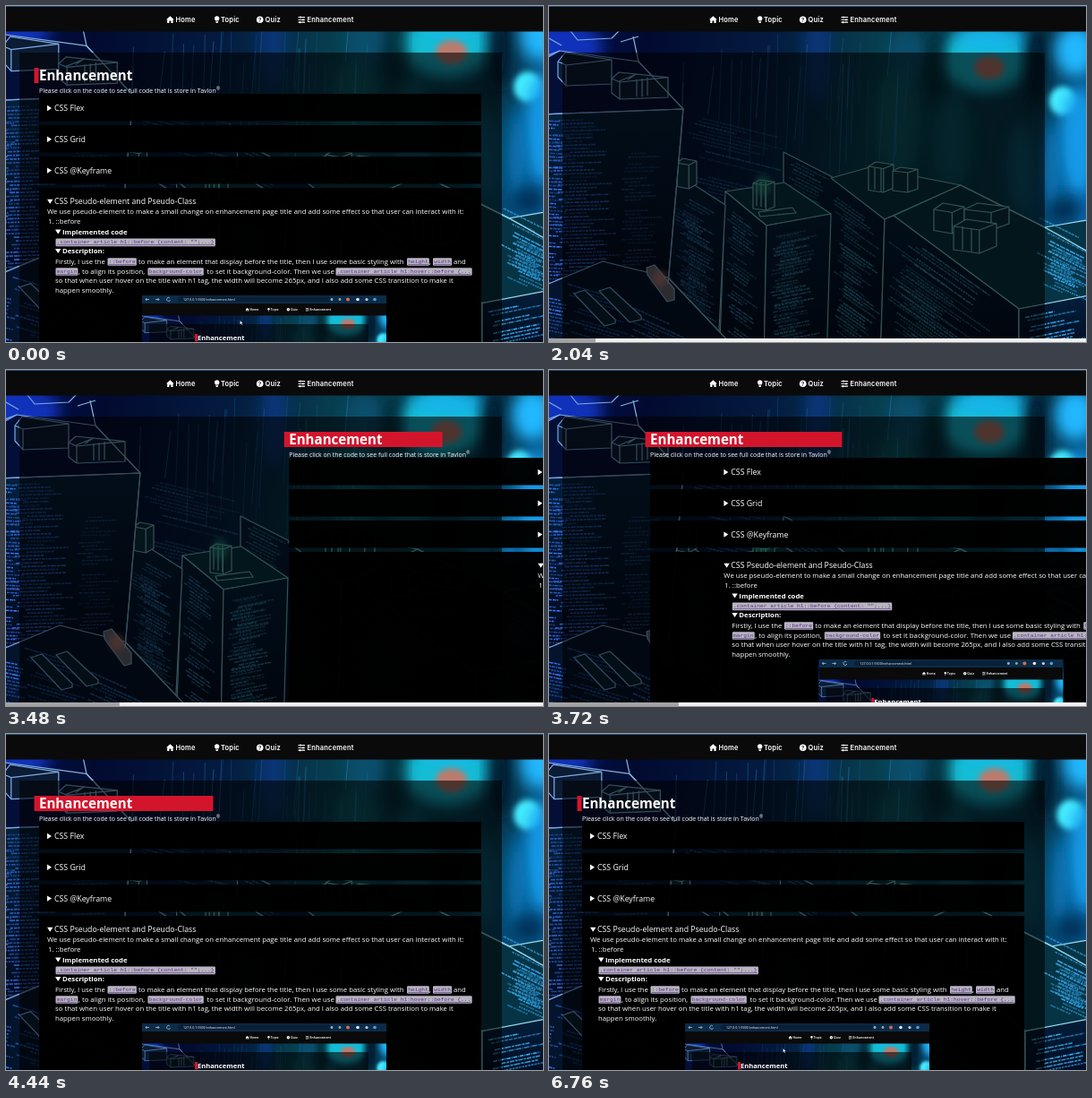
Recreate the animation shown at these times as an HTML page. Size 600x375 px, loop 6.8 s.

```html
<!DOCTYPE html>
<html lang="en">
<head>
<meta charset="utf-8">
<title>Enhancement</title>
<style>
html, body { margin: 0; width: 100%; height: 100%; overflow: hidden; background: #000; }
svg { display: block; width: 100vw; height: 100vh; }
text { font-family: "Open Sans", "Noto Sans", sans-serif; fill: #fff; font-size: 7.77px; white-space: pre; }
.nav text { font-family: Inter, "Open Sans", sans-serif; font-weight: 600; font-size: 7.5px; letter-spacing: .2px; }
.h1 { font-size: 15.1px; font-weight: 700; }
.sub { font-size: 6.94px; }
.sum { font-size: 8.75px; }
.b { font-weight: 700; }
text.code { font-family: "Liberation Mono", monospace; font-size: 6.24px; fill: #55308c; text-decoration: underline; }
.tiny { font-size: 3.6px; }
.edge, .face { stroke: url(#rim); stroke-width: 1.2; stroke-linejoin: round; }
.edge { fill: none; }
</style>
</head>
<body>
<svg viewBox="0 0 600 375" preserveAspectRatio="none">
  <defs>
    <linearGradient id="sky" x2="1" y2=".12">
      <stop offset="0" stop-color="#04145c"/><stop offset=".2" stop-color="#020a30"/><stop offset=".42" stop-color="#041c40"/>
      <stop offset=".6" stop-color="#083f50"/><stop offset=".88" stop-color="#06384c"/><stop offset="1" stop-color="#0866a8"/>
    </linearGradient>
    <linearGradient id="wall" x2="0" y2="1">
      <stop offset="0" stop-color="#04203c"/><stop offset="1" stop-color="#02091c"/>
    </linearGradient>
    <linearGradient id="rim" gradientUnits="userSpaceOnUse" x2="600">
      <stop offset="0" stop-color="#78a4e8"/><stop offset=".25" stop-color="#86bcd0"/>
      <stop offset=".5" stop-color="#74c4bc"/><stop offset=".85" stop-color="#7cc8c8"/><stop offset="1" stop-color="#a4e0ff"/>
    </linearGradient>
    <linearGradient id="ink" gradientUnits="userSpaceOnUse" x2="600">
      <stop offset="0" stop-color="#3a74ff"/><stop offset=".2" stop-color="#3a88d8"/>
      <stop offset=".5" stop-color="#38a0b8"/><stop offset=".85" stop-color="#3ca8c8"/><stop offset="1" stop-color="#30a8ff"/>
    </linearGradient>
    <filter id="soft" x="-50%" y="-50%" width="200%" height="200%"><feGaussianBlur stdDeviation="8"/></filter>
    <filter id="mild" x="-50%" y="-50%" width="200%" height="200%"><feGaussianBlur stdDeviation="3"/></filter>
    <clipPath id="shotClip"><rect x="152" y="323" width="273" height="52"/></clipPath>
    <g id="city"></g>
  </defs>
  <use id="back" href="#city"/>
  <rect x="15" y="52" width="539" height="323" fill="#000" fill-opacity=".58"/>
  <g id="article">
    <rect id="bar" x="31.5" y="69" height="17" fill="#d3152c"/>
    <text class="h1" x="37" y="83">Enhancement</text>
    <text class="sub" x="37" y="96.5">Please click on the code to see full code that is store in Tavlon<tspan dy="-2.4" font-size="5.4">®</tspan></text>
    <g id="boxes" fill="#000" fill-opacity=".98"></g>
    <g id="inner"></g>
  </g>
  <rect width="600" height="28.5" fill="#0a0a0b"/>
  <rect width="600" height="1" fill="#174a78"/>
  <g class="nav" id="nav" fill="#fff"></g>
  <g id="scroll">
    <rect y="371" width="600" height="4" fill="#f1f1f1"/>
    <rect id="thumb" y="371" height="4" fill="#a3a3a3"/>
  </g>
</svg>
<script>
const LOOP = 6800, RELOAD = 1840, START = 2490, SETTLE = 3983;
const $ = id => document.getElementById(id);
const clamp = (v, a = 0, b = 1) => Math.min(b, Math.max(a, v));
const span = (t, a, b) => clamp((t - a) / (b - a));

let seed = 7;
const rnd = () => (seed = seed * 16807 % 2147483647) / 2147483647;

// ---- backdrop ----
const glow = (x, y, rx, ry, c, o, f = 'soft') =>
  `<ellipse cx="${x}" cy="${y}" rx="${rx}" ry="${ry}" fill="${c}" opacity="${o}" filter="url(#${f})"/>`;
const face = (pts, fill = 'url(#wall)') => `<polygon class="face" points="${pts}" fill="${fill}"/>`;
const roof = pts => face(pts, '#063444');
const edge = d => `<path class="edge" d="${d}"/>`;

// rows of dashes that read as distant source code
function code(x, y, w, h, slope, op = .8) {
  let out = '';
  for (let r = 0; r < h; r += 4) {
    if (rnd() < .12) continue;
    const a = x + rnd() * w * .25, b = a + w * (.3 + rnd() * .45);
    const dash = [2 + rnd() * 5, 1, 1 + rnd() * 3, .8].map(n => n.toFixed(1)).join(' ');
    const at = px => `${px.toFixed(1)} ${(y + r + (px - x) * slope).toFixed(1)}`;
    out += `<path d="M${at(a)}L${at(b + .01)}" stroke-dasharray="${dash}" opacity="${(op * (.4 + rnd() * .6)).toFixed(2)}"/>`;
  }
  return `<g stroke="url(#ink)" stroke-width="1.6">${out}</g>`;
}

// small block: top-left x,y, size, and skew of its top
const block = (x, y, w, h, d) =>
  face(`${x},${y + d} ${x + w * .3},${y} ${x + w},${y + d * .6} ${x + w},${y + h - d} ${x + w * .6},${y + h} ${x},${y + h - d * .5}`, '#0a3540') +
  edge(`M${x} ${y + d}L${x + w * .6} ${y + d * 1.5}L${x + w} ${y + d * .6}M${x + w * .6} ${y + d * 1.5}V${y + h}`);

// flat low box with a front and a right side
const slab = (x, y, w, h, d) =>
  face(`${x},${y + d} ${x + 8},${y} ${x + w},${y + d * .8} ${x + w},${y + h - 2} ${x + 9},${y + h} ${x},${y + h - d}`, '#0b1c34') +
  edge(`M${x} ${y + d}L${x + 9} ${y + d + 4}L${x + w} ${y + d * .8}M${x + 9} ${y + d + 4}V${y + h}`);

let streaks = '';
for (let i = 0; i < 30; i++) {
  const x = 150 + rnd() * 260, y = 20 + rnd() * 70;
  streaks += `<path d="M${x} ${y}l-${2 + rnd() * 5} ${50 + rnd() * 80}" stroke="#2a84c0" opacity="${.15 + rnd() * .35}"/>`;
}

$('city').innerHTML =
  '<rect x="-10" y="-10" width="640" height="420" fill="url(#sky)"/>' +
  glow(10, 45, 50, 28, '#1440e8', .7) + glow(300, 50, 14, 60, '#0a3c98', .6) +
  glow(390, 130, 26, 60, '#0f6c74', .6) + glow(450, 150, 22, 55, '#0d6878', .55) + glow(400, 55, 22, 28, '#0a5a80', .6) +
  glow(527, 180, 16, 50, '#0e6a88', .6) +
  glow(487, 60, 48, 36, '#18c4dc', .95) + glow(495, 36, 45, 14, '#18b4f0', .8) + glow(492, 69, 17, 13, '#d8705c', .85, 'mild') +
  glow(545, 66, 11, 46, '#02182c', .95) + glow(432, 70, 9, 40, '#03202c', .7) +
  glow(588, 50, 22, 28, '#20b8ff', 1) + glow(574, 106, 15, 16, '#48f0ff', 1, 'mild') +
  glow(592, 150, 22, 60, '#14a0f0', .9) + glow(562, 180, 8, 50, '#0c80c8', .9) + glow(575, 228, 18, 14, '#042a50', .9) + streaks +
  code(150, 120, 120, 90, .25, .5) +
  // far towers
  face('262,163 315,190 375,238 370,400 262,400') + roof('315,192 358,180 460,200 375,238') +
  code(265, 170, 50, 60, .5, .6) + code(318, 212, 55, 165, .7) + code(322, 230, 48, 130, .7, .5) +
  roof('385,234 460,200 554,247 630,234 630,320 525,338') + face('385,234 525,338 525,400 370,400 375,238') +
  face('525,338 630,318 630,400 525,400') +
  code(388, 250, 120, 130, .7) + code(378, 262, 100, 110, .7, .6) +
  code(530, 348, 80, 40, -.2, 1) + code(545, 235, 70, 60, .5, 1) + code(552, 262, 60, 50, .45, 1) + edge('M460 200L554 247L630 290') +
  block(357, 174, 28, 34, 5) + block(384, 180, 28, 28, 4) + edge('M364 180V205M371 181V207') +
  block(430, 220, 34, 34, 7) + block(464, 220, 50, 30, 7) + block(452, 238, 48, 38, 8) + edge('M462 246V272M472 248V274') +
  roof('197,207 263,197 315,232 243,245') + face('197,207 243,245 240,400 190,400') + face('243,245 315,232 310,400 240,400') +
  code(198, 225, 42, 160, .7) + code(247, 256, 60, 130, -.2) + code(250, 258, 55, 125, -.2, .5) +
  block(228, 194, 24, 34, 4) + edge('M232 197V223M237 196V224M242 196V225M234 230l38-5 4 6-40 4z') + glow(239, 200, 9, 12, '#38c8a8', .45, 'mild') +
  face('135,185 147,190 197,222 188,400 130,400') + code(146, 210, 45, 140, .55) + code(140, 225, 50, 130, .55, .5) + block(143, 170, 22, 34, 5) +
  // near tower
  face('-10,62 12,50 100,62 150,115 0,122 -10,120', '#040f38') + face('-10,121 150,115 133,310 -10,330') +
  code(4, 128, 80, 180, -.03) + code(80, 165, 52, 130, -.03, .5) + code(-6, 128, 30, 190, .05, 1) +
  slab(10, 52, 60, 37, 10) + slab(70, 74, 63, 30, 7) + edge('M78 84l20-8M88 82l8-5M98 82V101M104 81V101M110 80V100') +
  edge('M24 28L32 38L70 36L78 28M80 40l20-6M-4 56L12 50M0 36l14 8M100 62L94 34') +
  face('-10,314 60,285 133,303 225,400 -10,400', '#03142c') + code(20, 310, 80, 60, .3, .6) + code(90, 335, 90, 60, .45) + code(-6, 325, 35, 50, .2, 1) +
  face('28,321 40,317 74,350 74,354 62,357', '#0a2234') + face('56,318 68,314 103,346 103,350 90,353', '#0a2234') +
  face('109,292 118,289 140,316 140,328 132,330 110,300', '#6a6a74') + glow(124, 304, 8, 9, '#e08478', .6, 'mild') +
  edge('M150 115L133 310M-10 121L150 115L100 62M133 303L225 400');

// ---- page content ----
const text = (x, y, s, cls = '') => `<text x="${x}" y="${y}" class="${cls}">${s}</text>`;
const closed = (x, y) => `<path d="M${x} ${y - 3.2}l5 3.2-5 3.2z" fill="#fff"/>`;
const open = (x, y) => `<path d="M${x} ${y - 2.5}h6.4l-3.2 5z" fill="#fff"/>`;
const chip = (x, base, s) =>
  `<rect x="${x}" y="${base - 6.4}" width="${s.length * 3.745 + 2.4}" height="8.6" rx="1.2" fill="#b9b5c0"/>` + text(x + 1.2, base - .6, s, 'code');

$('boxes').innerHTML = [[98, 30.5], [133, 30.5], [168, 30.5], [203, 180]]
  .map(([y, h]) => `<rect x="37" y="${y}" width="494" height="${h}"/>`).join('');

const nav =
  '<path d="M179 15.3l4.4-4 4.4 4h-1.2v3.7h-2.2v-2.4h-2v2.4h-2.2v-3.7z"/>' + text(189.5, 18, 'Home') +
  '<path d="M234 16.6c0-1-1-1.3-1-2.7a2.7 2.7 0 0 1 5.4 0c0 1.4-1 1.7-1 2.7zM234.300 17.200h2.800v1l-.8.9h-1.200l-.8-.9z"/>' + text(240, 18, 'Topic') +
  '<circle cx="283.7" cy="15.3" r="3.8"/><text x="282" y="17.6" style="fill:#0a0a0b;font-size:6px">?</text>' + text(289.5, 18, 'Quiz') +
  '<path d="M326.5 12.5h7.6M326.5 15.3h7.6M326.5 18.1h7.6M329 11.4v2.2M332 14.2v2.2M328.5 17v2.2" stroke="#fff" stroke-width="1.1"/>' + text(336.5, 18, 'Enhancement');
$('nav').innerHTML = nav;

const shot = `<g clip-path="url(#shotClip)">
  <use href="#city" transform="translate(146 322) scale(.48)"/>
  <rect x="160" y="355" width="245" height="20" fill="#000" fill-opacity=".58"/>
  <rect x="152" y="323" width="273" height="9" fill="#0c2c49"/>
  <rect x="192" y="324.3" width="170" height="6" rx="3" fill="#0a2038"/>
  <path d="M160 327.5h-4m1.5-1.5l-1.5 1.5 1.5 1.5M167 327.5h4m-1.5-1.5l1.5 1.5-1.5 1.5M183 326a2 2 0 1 0 .5 2" fill="none" stroke="#c8d4e0" stroke-width=".7"/>
  ${text(198, 328.9, '127.0.0.1:5500/enhancement.html', 'tiny')}
  <circle cx="364" cy="327.5" r="1.4" fill="#8fb4d8"/><circle cx="373" cy="327.5" r="1.4" fill="#9aa"/><circle cx="382" cy="327.5" r="2" fill="#d86a50"/>
  <circle cx="393" cy="327.5" r="1.8" fill="#e8e8e8"/><circle cx="403" cy="327.5" r="1.6" fill="#ccd"/><circle cx="412" cy="327.5" r="1.8" fill="#58a0d8"/>
  <rect x="152" y="332" width="273" height="13.5" fill="#0a0a0b"/>
  <g class="nav" transform="translate(186 331.8) scale(.456)" fill="#fff">${nav}</g>
  <rect id="shotBar" x="211" y="366" height="8.5" fill="#d3152c"/>
  <text x="214" y="372.9" class="b" style="font-size:7.6px">Enhancement</text>
  <path id="cursor" d="M0 0v4.4l1.1-1 .8 1.6.7-.3-.8-1.6h1.4z" fill="#fff" stroke="#222" stroke-width=".25"/>
</g>`;

$('inner').innerHTML =
  ['Flex', 'Grid', '@Keyframe'].map((s, i) => closed(46, 114 + i * 34.8) + text(54, 117 + i * 34.8, 'CSS ' + s, 'sum')).join('') +
  open(46, 218.3) + text(54, 221.2, 'CSS Pseudo-element and Pseudo-Class', 'sum') +
  text(46, 232.4, 'We use pseudo-element to make a small change on enhancement page title and add some effect so that user can interact with it:') +
  text(47, 243.3, '1. ::before') +
  open(55, 252) + text(63, 254.7, 'Implemented code', 'b') +
  chip(55.5, 266, '.container article h1::before {content: "";...}') +
  open(55, 273.4) + text(63, 276.2, 'Description:', 'b') +
  text(55, 287.6, 'Firstly, I use the') + chip(113.5, 287.6, '::before') +
  text(148, 287.6, 'to make an element that display before the title, then I use some basic styling with') +
  chip(448, 287.6, 'height') + text(473, 287.6, ',') + chip(477, 287.6, 'width') + text(500, 287.6, 'and') +
  chip(55.5, 298.6, 'margin') + text(81, 298.6, ', to align its position,') + chip(158.5, 298.6, 'background-color') +
  text(224.5, 298.6, 'to set it background-color. Then we use') + chip(368.5, 298.6, '.container article h1:hover::before {...') +
  text(55, 309.2, 'so that when user hover on the title with h1 tag, the width will become 265px, and I also add some CSS transition to make it') +
  text(55, 320, 'happen smoothly.') + shot;

// ---- animation ----
const article = $('article'), inner = $('inner'), bar = $('bar'), thumb = $('thumb');
const move = (el, x, y = 0) => el.setAttribute('transform', `translate(${x.toFixed(2)} ${y.toFixed(2)})`);

function draw(t) {
  const loading = t >= RELOAD && t < SETTLE;
  const away = loading ? (1 - span(t, START, SETTLE)) ** 2 * 5 : 0;
  move(article, away * 494);
  move(inner, away * 476);

  const grow = 275 * span(t, START, 4030);
  const shrink = 270 * span(t, 4030, 5510);
  bar.setAttribute('width', t < RELOAD ? 5 : grow - shrink);

  $('back').setAttribute('transform', loading ? '' : 'translate(-14 -20) scale(1.04)');
  $('scroll').style.display = loading ? '' : 'none';
  thumb.setAttribute('width', 52 + .0755 * Math.max(0, t - START));

  $('shotBar').setAttribute('width', t < RELOAD ? 3 + 57 * span(t, 800, 920) : 3);
  const cursor = $('cursor');
  cursor.style.display = t < RELOAD || t > 5880 ? '' : 'none';
  if (t < RELOAD) {
    const k = span(t, 0, 400);
    move(cursor, 261.5 - 19 * k, 351 + 11 * k);
  } else {
    const k = span(t, 5880, 6760);
    move(cursor, 300 - 38.5 * k, 338 + 13 * k);
  }
}

const begin = performance.now();
function tick(now) {
  draw(Math.max(0, now - begin) % LOOP);
  requestAnimationFrame(tick);
}
draw(0);
requestAnimationFrame(tick);
</script>
</body>
</html>
```
